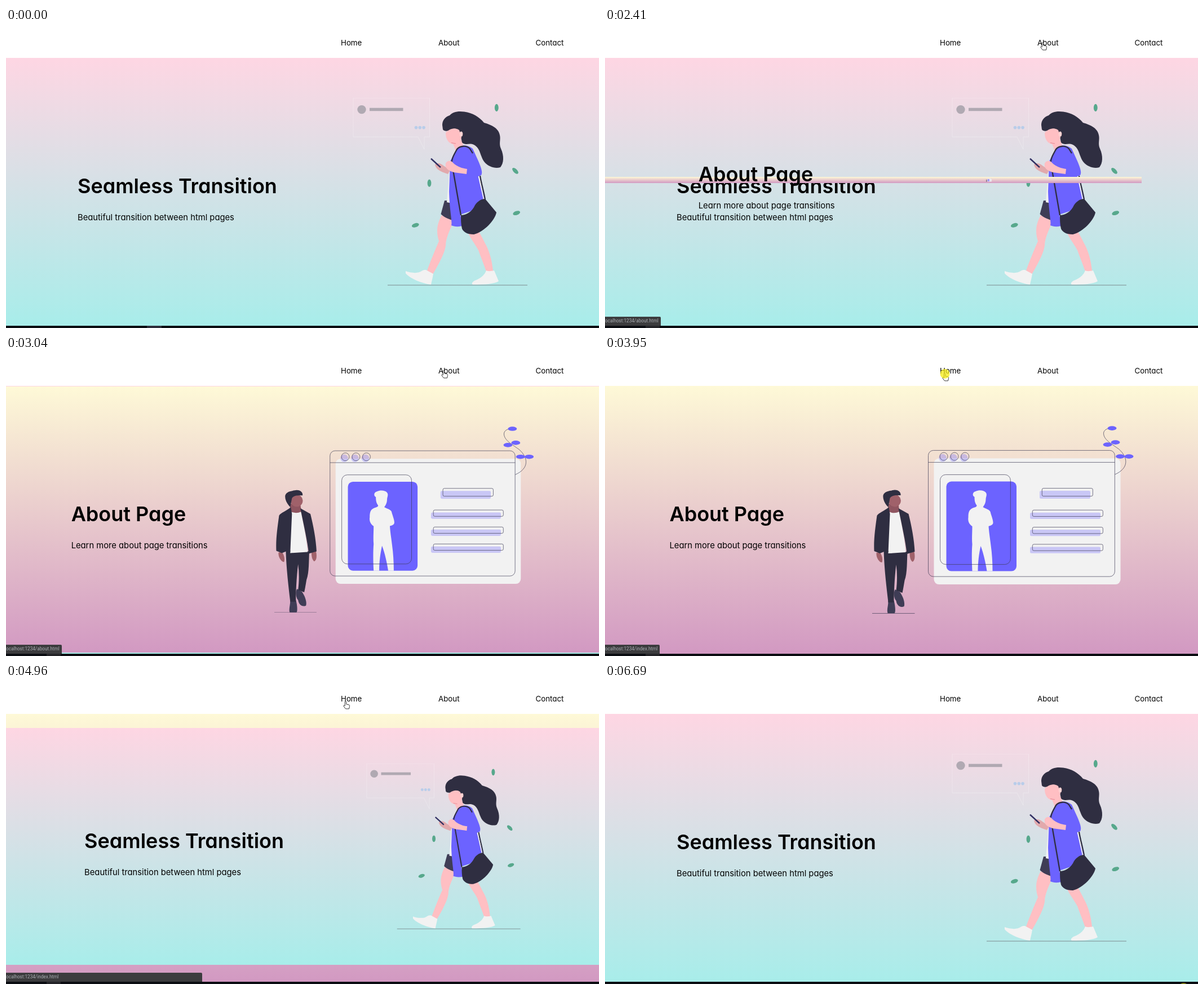
Animation, 1052 px wide and 532 px high, one loop 6.75 s. Source, as an HTML page:

```html
<!DOCTYPE html>
<html lang="en">
<head>
<meta charset="utf-8">
<title>Seamless Transition</title>
<style>
html, body { margin: 0; width: 100%; height: 100%; overflow: hidden; background: #fff; }
#stage { position: absolute; left: 0; top: 0; width: 1052px; height: 532px; overflow: hidden;
  font-family: Inter, sans-serif; font-feature-settings: "cv11"; color: #000; }
nav span { position: absolute; top: 16px; font-size: 13.3px; line-height: 20px; }
.page { --h: 475.2px; position: absolute; left: 0; top: 52.8px; width: 1052px; height: var(--h);
  display: flex; justify-content: space-evenly; align-items: center; }
#home { background: linear-gradient(#fed6e3, #a8edea); --text: 361px; --ratio: .932; }
#about { background: linear-gradient(#fef9d7, #d299c2); --text: 245px; --ratio: 1.3936; z-index: 2; }
.copy { position: relative; flex: none; width: var(--text); height: 0; white-space: nowrap; }
.copy h1, .copy p { position: absolute; left: 0; margin: 0; }
h1 { top: -37px; font-size: 36px; font-weight: 600; line-height: 54px; }
.copy p { top: 35px; font-size: 14.75px; line-height: 22px; }
.page svg { flex: none; overflow: hidden; height: calc(var(--h) * .7);
  width: calc(var(--h) * .7 * var(--ratio)); }
#status { position: absolute; left: 0; top: 512px; height: 15.5px; z-index: 5; background: #3c3c3e;
  border-radius: 0 2px 0 0; color: #a9adb2; font: 8.2px/15.5px Roboto, sans-serif;
  font-feature-settings: normal; text-indent: -2px; white-space: nowrap; overflow: hidden; }
#cursor { position: absolute; left: 0; top: 0; width: 1px; height: 1px; z-index: 6; overflow: visible; }
#cursor path { fill: #fff; stroke: #222; stroke-width: .9; stroke-linejoin: round; }
#taskbar { position: absolute; left: 0; top: 527.6px; width: 100%; height: 5px; z-index: 7; background: #0b0d12; }
#tab { position: absolute; top: 0; height: 5px; }
#click { position: absolute; left: -8.5px; top: -8.5px; width: 17px; height: 17px; border-radius: 50%;
  z-index: 8; background: #f4ea14; }
.dark { fill: #2f2e41; } .grey { fill: #3f3d56; } .skin { fill: #ffbfc3; }
.pale { fill: #f2f2f2; } .violet { fill: #6c63ff; } .brown { fill: #a0616a; }
.green { fill: #57a88c; } .soft { fill: #6c63ff; opacity: .3; }
.thin { fill: none; stroke: #3f3d56; stroke-width: .7; }
.strap { fill: none; stroke: #2f2e41; stroke-width: 2.3; }
</style>
</head>
<body>
<div id="stage">
  <nav>
    <span style="left:594px">Home</span>
    <span style="left:767px">About</span>
    <span style="left:939.5px">Contact</span>
  </nav>

  <section id="home" class="page">
    <div class="copy"><h1>Seamless Transition</h1><p>Beautiful transition between html pages</p></div>
    <svg viewBox="615 123.9 310 332.6">
      <path d="M616 124H751.5V193H742V215L731 193H616Z" fill="none" stroke="#fff" stroke-opacity=".3" stroke-width=".9"/>
      <g fill="#b0a9b2"><circle cx="631" cy="144.5" r="7.7"/><rect x="645" y="141.6" width="59.5" height="5.5"/></g>
      <g fill="#b9cdea"><circle cx="727.5" cy="176.5" r="2.8"/><circle cx="734.3" cy="176.5" r="2.8"/><circle cx="741.1" cy="176.5" r="2.8"/></g>
      <g class="green">
        <ellipse cx="870.3" cy="141.3" rx="3.4" ry="6.6"/>
        <ellipse cx="751" cy="275" rx="3.4" ry="6.6"/>
        <ellipse rx="6.8" ry="3.4" transform="translate(903.5 253.2) rotate(45)"/>
        <ellipse rx="6.6" ry="3.5" transform="translate(905.7 328) rotate(-18)"/>
        <ellipse rx="6.6" ry="3.5" transform="translate(726.3 349.6) rotate(-18)"/>
      </g>
      <path d="M677 456H925" stroke="#7d8c90"/>
      <path class="skin" d="M820 364C826 376 834 386 838 394C843 408 848 420 852 432L864 431C862 412 858 396 850 382C846 374 842 366 838 360Z"/>
      <path class="skin" d="M773 332C764 348 763 362 768 378C760 396 752 416 746 433L757 437C768 418 778 400 780 386C780 372 788 358 794 342Z"/>
      <path class="pale" d="M709 431C716 434 727 435 733 433C738 431 740 428 745 429L758 436C757 443 755 449 754 455C738 453 716 444 709 435Z"/>
      <path class="pale" d="M852 430C856 432 861 431 866 430L874 449C866 454 850 455 828 455C825 453 828 449 834 447C843 443 849 438 852 430Z"/>
      <path class="grey" d="M778 306L771.5 330C777 336 787 339 794 342L796 306Z"/>
      <path class="skin" d="M791 202L806 195L813 212L799 222C797 216 796 210 791 202Z"/>
      <path class="pale" d="M799 216L788 236L786 262L782 309L792 311L804 218Z"/>
      <path d="M761 242C766 238 772 240 776 244L788 252L784 259C776 256 763 253 761 242Z" fill="#e2a9ac"/>
      <path class="dark" d="M774 172C774 163 780 157 787 155C792 149 802 146.5 813 148.5C828 151 839 157 848 168C862 172 874 178 876 190C878 198 874 205 878 214C884 227 883 240 877 247C868 250 856 246 849 238C841 228 842 213 830 207C822 203 815 209 809 203L806 188C805 180 798 177 792 179C786 183 778 184 775 180Z"/>
      <path class="skin" d="M780 186C783 181 795 174 804 181L808 194C803 203 800 206 797 206C786 207 780 198 780 186Z"/>
      <ellipse cx="807.5" cy="188" rx="2.8" ry="4.6" fill="#ffd3d3"/>
      <path d="M790 203.5L798 205" stroke="#e58a96" fill="none"/>
      <path class="violet" d="M800 214C808 206 820 207 828 214L838 236C843 248 846 256 843 261L838 263L849 302C840 306 836 312 832 322L806 331C808 340 809 348 810 351C802 353 794 352 790 350C792 342 787 326 786 290L788 236Z"/>
      <path class="strap" d="M791 242C789 234 795 224 800 215C806 208 817 208 823 214L828 222M791 240L807 332M841 262C843 275 847 288 850 304"/>
      <path d="M838.5 263L847.5 303" stroke="#f2f2f2" stroke-width="1.8"/>
      <path class="dark" d="M807 332C814 332 824 328 830 318C834 309 842 303 850 303L870 327C868 340 848 362 830 366C818 366 812 362 809 356C807 348 807 340 807 332Z"/>
      <path class="skin" d="M780 240C782 235 790 234 793 239C800 246 810 249 818 250L817 259C806 257 792 257 785 252C780 248 779 244 780 240Z"/>
      <path d="M754 231.5L771 247" stroke="#2f2e61" stroke-width="2.6"/>
    </svg>
  </section>

  <section id="about" class="page">
    <div class="copy"><h1>About Page</h1><p>Learn more about page transitions</p></div>
    <svg viewBox="474.5 123.9 463.5 332.6">
      <rect class="pale" x="584" y="181.5" width="331" height="223.5" rx="9"/>
      <g class="soft"><circle cx="599.5" cy="180.5" r="6.8"/><circle cx="618.5" cy="180.5" r="6.8"/><circle cx="637.2" cy="180.5" r="6.8"/></g>
      <g class="thin">
        <rect x="574" y="167.3" width="330.8" height="223.7" rx="9"/><path d="M574 188.5H905"/>
        <circle cx="601.5" cy="178" r="7"/><circle cx="620.5" cy="178" r="7"/><circle cx="639.2" cy="178" r="7"/>
      </g>
      <rect class="violet" x="606" y="222.5" width="124.5" height="159" rx="9"/>
      <path class="pale" d="M656 250C651 247 653 241 658 240C664 237 673 238 676 242C679 246 676 250 676 254C676 262 672 266 671 268C676 271 682 272 684 276C686 284 689 290 689 296C688 301 682 301 681 302C682 316 684 326 685 336C687 350 688 366 688 381.5H678C676 368 672 350 667 337C664 350 662 366 662 381.5H652C651 362 651 346 652 334C651 324 652 314 652 302C646 298 644 292 645 286C645 278 646 273 652 270C657 268 660 268 660 265C656 260 656 254 656 250Z"/>
      <rect class="thin" x="595" y="210.3" width="124.8" height="159.2" rx="10"/>
      <g class="soft" id="bars"></g><g class="thin" id="frames"></g>
      <path class="thin" d="M905 210C930 199 929 180 912 165C898 155 885 148 885 137C885 131 892 128 897 128"/>
      <g class="violet">
        <ellipse cx="900" cy="128" rx="8" ry="3.8"/><ellipse cx="906" cy="153" rx="8" ry="3.8"/>
        <ellipse cx="892" cy="157" rx="8" ry="3.8"/><ellipse cx="914.5" cy="178" rx="8" ry="3.8"/>
        <ellipse cx="930" cy="178" rx="8" ry="3.8"/>
      </g>
      <path class="thin" d="M474.5 456.3H550"/>
      <path class="brown" d="M482 349C481 357 487 366 492 366C494 358 491 352 488 348ZM541 349L549 347C551 356 550 363 546 365C542 362 541 356 541 349Z"/>
      <path class="grey" d="M503 434L513 434C516 444 516 456 514 456L502 456C500 450 503 444 503 434ZM515 414L524 419C530 428 533 438 531 444C524 447 518 442 517 434C513 430 512 420 515 414Z"/>
      <path class="dark" d="M495 345L537 347C536 362 537 385 532 398C530 410 529 416 528 420L517 416C519 400 519 385 517 370C514 395 513 420 513 437L503 437C500 410 496 380 495 345Z"/>
      <path d="M502 262L521 262L523 277C517 280 509 280 504 277Z" fill="#8f5560"/>
      <circle class="brown" cx="514.5" cy="256.5" r="10.8"/>
      <path class="dark" d="M494 247C496 240 505 239 511 238C518 236 526 240 525 247C517 247 510 246 506 252L503 268C497 262 493 254 494 247Z"/>
      <path class="pale" d="M504 276C510 279 517 279 522 276C527 300 532 325 534 348L503 350Z"/>
      <path class="dark" d="M504 268C496 275 486 278 483 283C480 305 477 325 478 346L488 350L498 346L503 348L506 280ZM521 270L539 280C544 300 549 325 550 347L536 351C534 330 527 300 521 270Z"/>
    </svg>
  </section>

  <div id="status"></div>
  <svg id="cursor">
    <path id="arrow" d="M0 0V11.5L2.7 9L4.6 13L6.3 12.2L4.5 8.3H8Z"/>
    <path id="hand" d="M-1.2 .8C-1.2 -.7 1.2 -.7 1.2 .8V4.8L5.5 5.8C7 6.2 7.2 7 7 8.5L6 13H0L-3.5 8.5C-4.2 7.2 -3 6.2 -1.2 7.8Z"/>
  </svg>
  <div id="taskbar"><div id="tab"></div></div>
  <div id="click"></div>
</div>

<script>
const LOOP = 6750, SLIDE = 500, OPEN_DELAY = 508;
const TO_ABOUT = 2064, TO_HOME = 4126;
const $ = id => document.getElementById(id);
const clamp = x => Math.min(1, Math.max(0, x));
const easeOut = x => 1 - (1 - clamp(x)) ** 2;
const within = (t, a, b) => t >= a && t < b;

// Text bars of the browser window: x, y, width, height
const bars = [[771.5, 239, 90, 14], ...[0, 1, 2].map(i => [754.5, 277.6 + i * 30.35, 125, 11.3])];
const rects = (dx, dy) => bars.map(([x, y, w, h]) =>
  `<rect x="${x + dx}" y="${y + dy}" width="${w}" height="${h}" rx="2.5"/>`).join('');
$('bars').innerHTML = rects(0, 0);
$('frames').innerHTML = rects(4.3, -4.5);

// Pointer stops: time, x, y
const stops = [
  [150, 1010, 545], [830, 680, 58], [880, 680, 58], [1310, 768, 33], [1600, 768, 33],
  [1690, 775, 35], [1940, 775, 35], [2040, 776.5, 26], [3250, 776.5, 26], [3870, 602.5, 31],
  [5330, 602.5, 31], [5970, 938, 545], [6580, 938, 545], [6590, 1026, 538]
];

function pointerAt(t) {
  const i = stops.findIndex(s => s[0] > t);
  if (i < 1) return stops[i ? stops.length - 1 : 0].slice(1);
  const [a, b] = [stops[i - 1], stops[i]];
  const k = easeOut((t - a[0]) / (b[0] - a[0]));
  return [a[1] + (b[1] - a[1]) * k, a[2] + (b[2] - a[2]) * k];
}

// Slide in as a thin strip, then open to full height
function placePage(el, age) {
  const open = easeOut((age - OPEN_DELAY) / SLIDE);
  el.style.left = -1052 * (1 - easeOut(age / SLIDE)) + 'px';
  el.style.top = 264 - 211.2 * open + 'px';
  el.style.setProperty('--h', 10.56 + 464.64 * open + 'px');
}

function render(t) {
  const s = 2410 + Math.floor((t - 2395) / 77.3) * 77.3;

  const back = s >= TO_HOME, full = OPEN_DELAY + SLIDE;
  placePage($('home'), back ? s - TO_HOME : full);
  $('home').style.zIndex = back ? 3 : 1;
  placePage($('about'), s - TO_ABOUT);
  $('about').style.display = within(s, TO_ABOUT, TO_HOME + full) ? '' : 'none';

  const onAbout = within(t, 1470, 3345), onHome = within(t, 3795, 5425);
  const status = $('status');
  status.style.display = onAbout || onHome ? '' : 'none';
  status.style.width = (onAbout ? 98.5 : t < 4480 ? 96.5 : 348) + 'px';
  status.textContent = `localhost:1234/${onAbout ? 'about' : 'index'}.html`;

  const [x, y] = pointerAt(s);
  $('cursor').style.transform = `translate(${x}px, ${y}px)`;
  $('cursor').style.display = within(t, 210, 5970) ? '' : 'none';
  $('hand').style.display = onAbout || onHome ? '' : 'none';
  $('arrow').style.display = onAbout || onHome ? 'none' : '';

  const leaving = t >= 6600;
  const click = $('click').style;
  click.display = leaving || within(t, 1700, 1950) || within(t, 3950, 4180) ? '' : 'none';
  click.transform = `translate(${x}px, ${y}px)`;
  click.opacity = leaving ? .5 : .75;

  const tab = $('tab').style, early = t < 1950;
  tab.display = leaving ? 'none' : '';
  tab.left = early ? '250px' : '72px';
  tab.width = early ? '26px' : '25px';
  tab.background = early ? '#2d2d3a' : '#242428';
}

const start = performance.now();
function tick() {
  render((performance.now() - start) % LOOP);
  requestAnimationFrame(tick);
}
tick();
</script>
</body>
</html>
```
